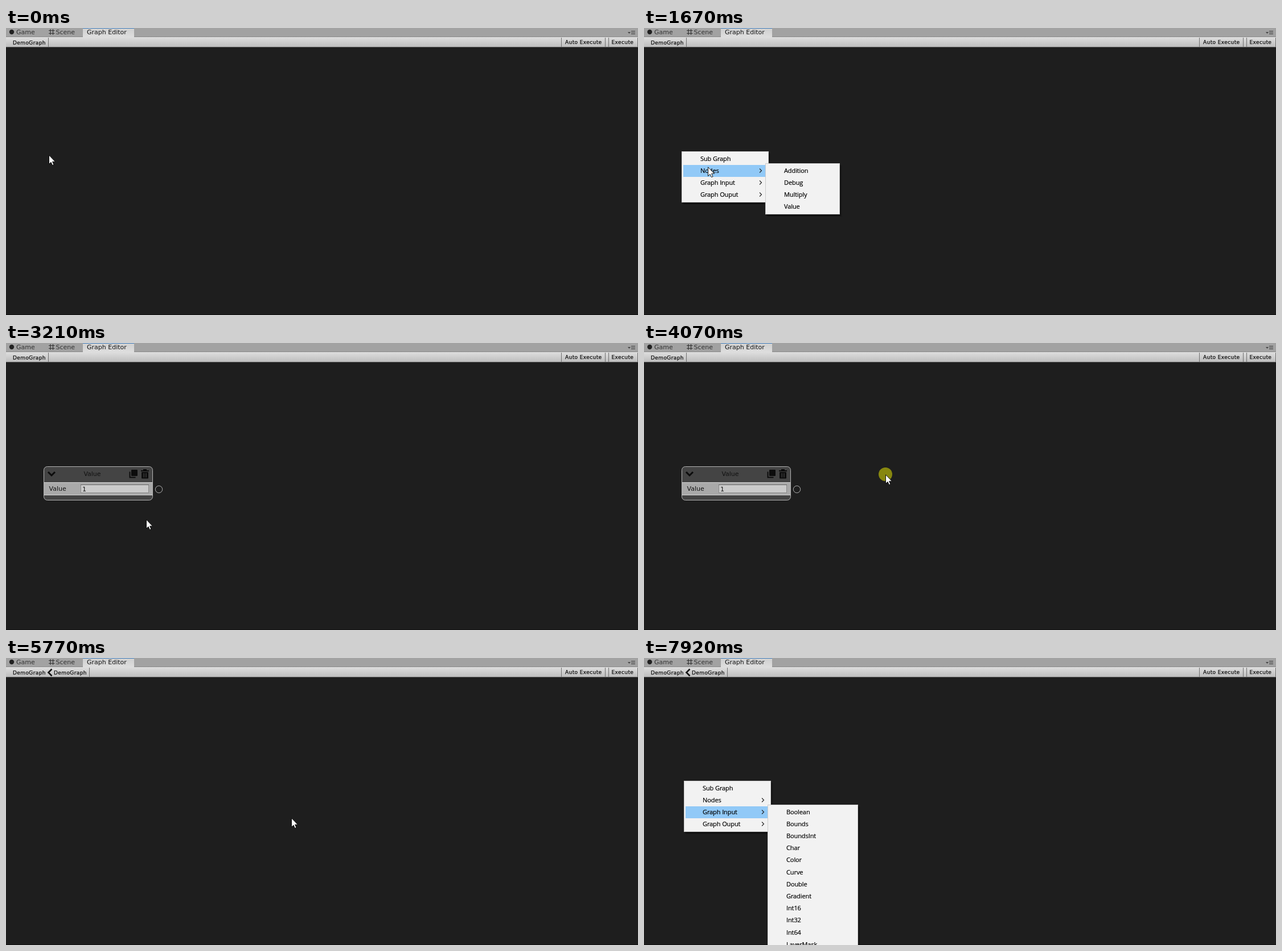
Write an HTML page that moves like this. It is 1110 px wide and 505 px high and loops after 8000 ms.

```html
<!DOCTYPE html>
<html lang="en">
<head>
<meta charset="utf-8">
<title>Graph Editor</title>
<style>
  html, body { margin: 0; width: 100%; height: 100%; overflow: hidden; background: #1e1e1e; }
  svg { display: block; }
  text { white-space: pre; fill: #111; }
  .ui { font: 11px "DejaVu Sans", sans-serif; }
  .small { font: 9px "DejaVu Sans", sans-serif; letter-spacing: .4px; stroke: #111; stroke-width: .25px; }
  .menu { font: 11px "Open Sans", "Noto Sans", sans-serif; letter-spacing: -.1px; fill: #000; stroke: #000; stroke-width: .2px; }
</style>
</head>
<body>
<svg id="stage" width="1110" height="505" viewBox="0 0 1110 505"></svg>
<script>
const LOOP = 8000, STEP = 77, ROW = 21.2, PAD = 2.5, MENU_W = 153;
const stage = document.getElementById('stage');

// start time, number of steps, end x, end y
const START = [75, 223];
const MOVES = [
  [290, 3, 66, 217],
  [980, 5, 106, 242],
  [1520, 3, 112, 244], [1750, 4, 228, 252], [2057, 4, 246, 310],
  [2680, 1, 247, 312], [3130, 2, 246, 310],
  [3440, 5, 422, 225], [3840, 1, 424, 231],
  [4220, 4, 445, 243], [4760, 3, 432, 240],
  [5140, 4, 501, 281],
  [6000, 2, 330, 313], [6154, 3, 70, 216],
  [6690, 4, 135, 271],
  [7380, 4, 290, 275], [7690, 4, 300, 520]
];

// start and end of each mouse press
const CLICKS = [[520, 600], [2370, 2450], [3990, 4150], [4600, 4680], [5690, 5770], [6460, 6620]];

const MAIN = ['Sub Graph', 'Nodes', 'Graph Input', 'Graph Ouput'];
const NODES = ['Addition', 'Debug', 'Multiply', 'Value'];
const TYPES = ['Boolean', 'Bounds', 'BoundsInt', 'Char', 'Color', 'Curve', 'Double',
  'Gradient', 'Int16', 'Int32', 'Int64', 'LayerMask'];
const MENUS = [
  { x: 66, y: 217, open: 600, close: 2450, pick: 3,
    sub: { x: 213, y: 238, w: 131, row: 1, open: 1520, items: NODES } },
  { x: 424, y: 231, open: 4150, close: 4680, pick: 0 },
  { x: 70, y: 216, open: 6620, close: LOOP,
    sub: { x: 217, y: 258, w: 159, row: 2, open: 7300, items: TYPES } }
];

const rect = (x, y, w, h, fill, more = '') =>
  `<rect x="${x}" y="${y}" width="${w}" height="${h}" fill="${fill}" ${more}/>`;
const text = (x, y, s, cls = 'ui', more = '') => `<text x="${x}" y="${y}" class="${cls}" ${more}>${s}</text>`;
const line = (d, color, width) => `<path d="${d}" fill="none" stroke="${color}" stroke-width="${width}"/>`;
const group = (alpha, body) => `<g opacity="${alpha}">${body}</g>`;

function pointer(t) {
  let [x, y] = START;
  for (const [from, n, ex, ey] of MOVES) {
    if (t + 8 < from) break;
    const p = Math.min(n, Math.floor((t + 8 - from) / STEP) + 1) / n;
    x += (ex - x) * p;
    y += (ey - y) * p;
  }
  return [Math.round(x), Math.round(y)];
}

const separator = x => rect(x, 17, 1, 16, '#6f6f6f');

function toolbar(nested) {
  return rect(0, 0, 1110, 15, '#a2a2a2') +
    rect(0, 15, 1110, 19, 'url(#bar)') + rect(0, 15, 1110, 1, '#8a8a8a') + rect(0, 33, 1110, 1, '#707070') +
    rect(135, 0, 90, 16, 'url(#tab)') + rect(135, 0, 90, 1, '#3f7cbb') +
    '<circle cx="10" cy="7" r="4.2" fill="#222"/>' +
    line('M78 2V12M82.5 2V12M75 4.5H85.5M75 9.5H85.5', '#333', 1.2) +
    text(18, 11, 'Game', 'ui', 'style="fill:#333"') +
    text(87.5, 11, 'Scene', 'ui', 'style="fill:#333"') +
    text(142, 11, 'Graph Editor') +
    '<path d="M1092 7h5l-2.500 3z" fill="#444"/>' +
    line('M1098 5.500h7M1098 8h7M1098 10.500h7', '#444', 1.1) +
    text(12, 29, 'DemoGraph', 'small') +
    (nested
      ? line('M80.500 19.500L74.500 25.500L80.500 31.500', '#111', 2.6) + text(84, 29, 'DemoGraph', 'small') + separator(146)
      : separator(74)) +
    [975, 1052, 1058, 1109].map(separator).join('') +
    text(982, 28, 'Auto Execute', 'small') + text(1063.5, 28, 'Execute', 'small');
}

function nodeBox(x, y, h, title, body) {
  const bottom = h - 9;
  return `<g transform="translate(${x} ${y})">` +
    rect(.5, .5, 191, h - 1, '#444', 'rx="6"') +
    rect(1, 28, 190, bottom - 28, '#a9a9a9') +
    rect(1, 28, 190, 1, '#d2d2d2') + rect(1, bottom - 1, 190, 1, '#d2d2d2') +
    rect(.5, .5, 191, h - 1, 'none', 'rx="6" stroke="#b4b4b4"') +
    line('M8 10L14 16L20 10', '#0c0c0c', 3) +
    text(85.5, 17, title, 'ui', 'text-anchor="middle"') +
    // duplicate and delete icons
    line('M151.500 9.500V19.500H161.500', '#0c0c0c', 2) + rect(154, 6, 11, 11, '#0c0c0c', 'rx="1"') +
    rect(171, 7, 14, 2, '#0c0c0c') + rect(175, 5, 6, 3, '#0c0c0c') +
    rect(172, 10, 12, 11.5, '#0c0c0c', 'rx="1"') +
    line('M175.500 12V19.500M178 12V19.500M180.500 12V19.500', '#444', .9) +
    body + '</g>';
}

function field(x, y, w, h, value) {
  return rect(x + .5, y + .5, w - 1, h - 1, '#cbcbcb', 'stroke="#8a8a8a"') +
    rect(x, y, w, 1, '#666') + text(x + 3, y + 12, value);
}

const valueNode = () => nodeBox(66, 217, 60, 'Value',
  text(9.5, 43, 'Value') + field(65, 32, 120, 15, '1') +
  '<circle cx="202.500" cy="40.500" r="6.200" fill="none" stroke="#b0b0b0"/>');

const subNode = () => nodeBox(424, 230, 74, 'Sub Graph',
  text(9.5, 42, 'Graph') + field(65, 31, 120, 15, 'DemoGraph') +
  rect(8.5, 48.5, 175, 13, '#cfcfcf', 'rx="3" stroke="#666"') +
  text(96, 58.5, 'Edit', 'small', 'text-anchor="middle"'));

function menuRow(x, y, w, label, i, lit) {
  const top = y + PAD + i * ROW;
  return (lit ? rect(x + 3, Math.round(top), w - 6, 21, '#91c9f7') : '') +
    text(x + 33, Math.round(top + 14), label, 'menu');
}

function panel(x, y, w, items, lit) {
  const h = Math.round(items.length * ROW + 2 * PAD);
  return rect(x + 4, y + 4, w, h, '#000', 'opacity=".15"') +
    rect(x + 2, y + 3, w, h, '#000', 'opacity=".3"') +
    rect(x + .5, y + .5, w - 1, h - 1, '#f2f2f2', 'stroke="#ccc"') +
    items.map((s, i) => menuRow(x, y, w, s, i, i === lit)).join('');
}

function hovered(x, y, w, [px, py]) {
  return px >= x && px < x + w ? Math.floor((py - y - PAD) / ROW) : -1;
}

const appear = age => age < 75 ? .5 : 1;

function menu(m, t, at) {
  const { x, y, sub } = m;
  if (t < m.open) return '';
  if (t >= m.close) {
    const age = t - m.close;
    if (age >= 150) return '';
    const s = sub || { x, y, w: MENU_W, items: MAIN };
    return group(age < 80 ? .64 : .3, menuRow(s.x, s.y, s.w, s.items[m.pick], m.pick, true));
  }
  const subOpen = sub && t >= sub.open;
  let out = panel(x, y, MENU_W, MAIN, subOpen ? sub.row : hovered(x, y, MENU_W, at));
  for (let i = 1; i < MAIN.length; i++) {
    const c = Math.round(y + PAD + i * ROW) + 10;
    out += line(`M${x + 137} ${c - 3.5}l3.500 3.500l-3.500 3.500`, '#222', 1.1);
  }
  out = group(appear(t - m.open), out);
  if (subOpen) {
    const p = panel(sub.x, sub.y, sub.w, sub.items, hovered(sub.x, sub.y, sub.w, at));
    out += group(appear(t - sub.open), p);
  }
  return out;
}

function cursor([x, y], pressed) {
  return (pressed ? `<circle cx="${x}" cy="${y}" r="12" fill="#ff0" opacity=".47"/>` : '') +
    `<path transform="translate(${x} ${y})" d="M.500 .800V16.500L4 13.200L6.500 18.500L9 17.500L6.600 12.200H11.500Z"
      fill="#fff" stroke="#000" stroke-width=".9"/>`;
}

const DEFS = `<defs>
  <linearGradient id="tab" x2="0" y2="1"><stop stop-color="#cfcfcf"/><stop offset="1" stop-color="#dedede"/></linearGradient>
  <linearGradient id="bar" x2="0" y2="1"><stop stop-color="#e0e0e0"/><stop offset="1" stop-color="#bdbdbd"/></linearGradient>
</defs>`;

function scene(t) {
  const at = pointer(t);
  const nested = t >= 5770;
  return DEFS + rect(0, 0, 1110, 505, '#1e1e1e') + rect(0, 504, 1110, 1, '#111') +
    toolbar(nested) +
    (t >= 2600 && !nested ? valueNode() : '') +
    (t >= 4830 && !nested ? subNode() : '') +
    MENUS.map(m => menu(m, t, at)).join('') +
    cursor(at, CLICKS.some(([a, b]) => t >= a && t < b));
}

const begin = performance.now();
let shown = '';
function tick() {
  const next = scene((performance.now() - begin) % LOOP);
  if (next !== shown) stage.innerHTML = shown = next;
  requestAnimationFrame(tick);
}
tick();
</script>
</body>
</html>
```
